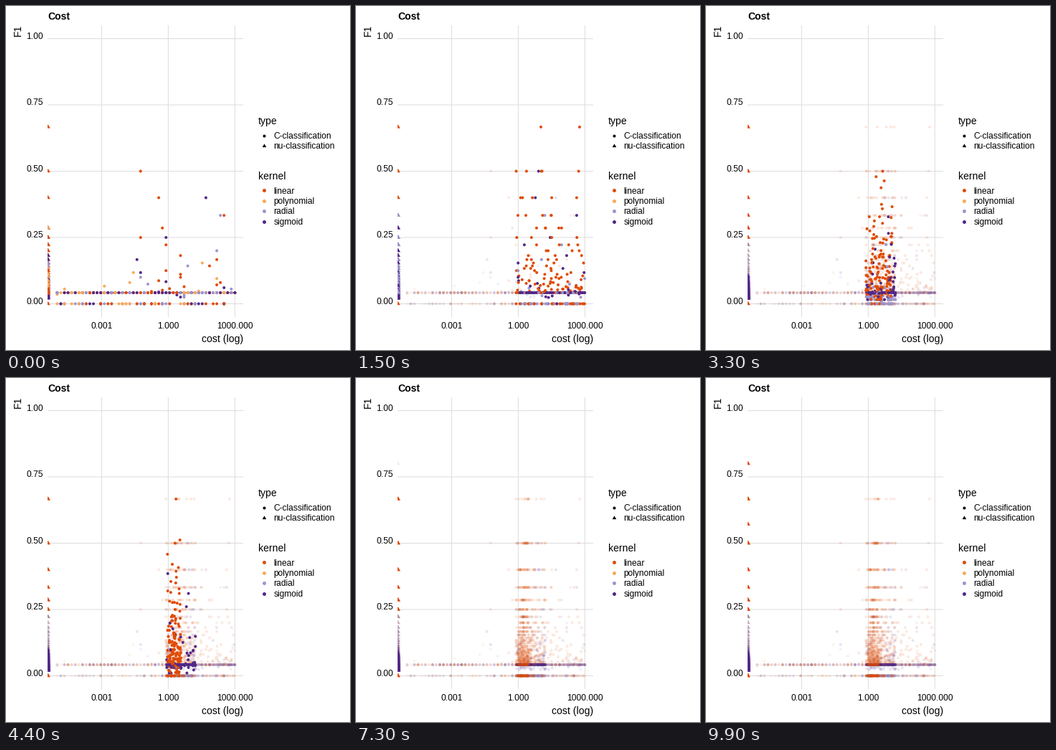
Recreate the animation shown at these times as a matplotlib script. Size 480 by 480 pixels, loop 10000 ms.

```python
import numpy as np
import matplotlib.pyplot as plt
from matplotlib.animation import FuncAnimation
from matplotlib.patches import Rectangle

SIZE, DPI, FRAMES = 480, 100, 100
PT = 72 / DPI
LEFT, RIGHT, TOP, BOTTOM = 58, 331, 27, 434
COLORS = {"linear": "#e04b04", "polynomial": "#fba859",
          "radial": "#9c95cc", "sigmoid": "#522888"}
KERNELS = list(COLORS)
FADE = 0.12
COMMON = 2 / 48  # the score most models share

# Evenly timed generations; the second one brings nothing new.
KEYS = np.delete(np.round(np.arange(14) * (FRAMES - 1) / 13).astype(int), 1)

# Last generation with circles, then count, share common, share zero, best k, worst k
LAST = {"linear": 7, "polynomial": 0, "radial": 4, "sigmoid": 5}
MIX = {"linear": (150, .15, .17, 3, 45),
       "polynomial": (95, .7, .22, 10, 60),
       "radial": (70, .35, .5, 4, 90),
       "sigmoid": (105, .74, .05, 3, 90)}

rng = np.random.default_rng(7)
SPREAD = {k: rng.random(MIX[k][0]) for k in KERNELS}


def to_y(score):
    return 415.5 - 370 * np.asarray(score, float)


def levels(n, best, worst):
    """Scores of the form 2/k, few good ones and many poor ones."""
    u = (np.arange(n) + .5) / n
    return 2 / np.round(best * (worst / best) ** u ** .7)


def scores(n, common, zero, best, worst):
    a, b = round(n * common), round(n * zero)
    y = np.r_[np.full(a, COMMON), np.zeros(b), levels(n - a - b, best, worst)]
    return rng.permutation(y)


def first_circles(kern):
    """A coarse grid over all costs; good scores need a high cost."""
    extra = .2 if kern == "linear" else .09
    y = scores(95, .8 - extra, .2, *MIX[kern][3:])
    i = rng.integers(0, 50, len(y))
    good = (y > 0) & (y != COMMON) & (kern != "polynomial")
    i = np.where(good, 22 + i * 27 // 49, i)
    return 71.4 + i * 248 / 49, y


def circles(g):
    out = {}
    for kern in KERNELS:
        if g > LAST[kern]:
            continue
        if g == 0:
            out[kern] = first_circles(kern)
            continue
        right = 319.4 if g == 1 else 264.5
        if kern == "linear":
            right = np.interp(g, [1, 2, 3, 5], [319.4, 264.5, 264.5, 241])
        left = 223 + 3 * (kern == "linear" and g > 4)
        out[kern] = (left + SPREAD[kern] * (right - left), scores(*MIX[kern]))
    return out


def triangles(g):
    """Models without a cost, stacked on the left edge."""
    top = [np.inf, *range(3, min(6 + g, 9))]
    if g == 7 or g > 9:
        top.append(2.5)
    if g > 9:
        top.append(3.5)
    out = {"linear": 2 / np.array(top)}
    for kern in KERNELS[(0, 2, 3)[min(g, 2)]:]:
        best = 15 + g if g > 1 else 6
        cloud = levels(60 if g else 34, best, 100 if kern == "sigmoid" else 55)
        out[kern] = np.r_[out.get(kern, []), cloud]
    return {k: (np.full(len(y), LEFT + .7), y) for k, y in out.items()}


dots = [circles(g) for g in range(len(KEYS))]
tris = [triangles(g) for g in range(len(KEYS))]


def blend(a, b, t):
    if t == 0:
        return a
    out = {}
    for kern in a:
        if kern in b:
            n = min(len(a[kern][0]), len(b[kern][0]))
            out[kern] = [p[:n] * (1 - t) + q[:n] * t for p, q in zip(a[kern], b[kern])]
    return out


def flatten(group):
    """Positions and colours of all kernels in one shuffled drawing order."""
    if not group:
        return np.empty((0, 2)), []
    xy = np.concatenate([np.c_[x, to_y(y)] for x, y in group.values()])
    cols = np.repeat([COLORS[k] for k in group], [len(v[0]) for v in group.values()])
    order = np.random.default_rng(3).permutation(len(xy))
    return xy[order], list(cols[order])


fig = plt.figure(figsize=(SIZE / DPI, SIZE / DPI), dpi=DPI, facecolor="white")
ax = fig.add_axes([0, 0, 1, 1])
ax.set(xlim=(0, SIZE), ylim=(SIZE, 0))
ax.axis("off")
panel = Rectangle((LEFT, TOP), RIGHT - LEFT, BOTTOM - TOP, transform=ax.transData)


def label(x, y, s, px=12, va="baseline", **kw):
    ax.text(x, y, s, fontsize=px * PT, family="Liberation Sans", color="black",
            va=va, **kw)


def rule(xs, ys):
    ax.plot(xs, ys, color="#dedede", lw=1.07 * PT, snap=False, zorder=0,
            solid_capstyle="butt")


def marks(xy, cols, tri=False, r=None, clip=True, **kw):
    r = r or (3.5 if tri else 2)
    xy = np.asarray(xy, float)
    pts = ax.scatter(xy[:, 0], xy[:, 1], s=(2 * r * PT) ** 2, c=cols, linewidths=0,
                     marker=(3, 0, 0) if tri else "o", **kw)
    if clip:
        pts.set_clip_path(panel)
    return pts


for v in np.linspace(0, 1, 5):
    y = to_y(v)
    rule([LEFT, RIGHT], [y, y])
    label(52, y + .4, f"{v:.2f}", ha="right")
for i, s in enumerate(("0.001", "1.000", "1000.000")):
    x = 133.4 + 93 * i
    rule([x, x], [TOP, BOTTOM])
    label(x - .2, 449.5, s, ha="center")

label(58, 19, "Cost", 14, weight="bold")
label(331, 469, "cost (log)", 14, ha="right")
label(24, 26, "F1", 14, rotation=90, ha="right", va="top")

label(352, 165, "type", 14)
label(352, 242, "kernel", 14)
for i, name in enumerate(("C-classification", "nu-classification")):
    y = 181 + 14.4 * i
    marks([(359.8, y)], "black", tri=i == 1, r=2 + 1.2 * i, clip=False)
    label(373.4, y + 4, name)
for i, (name, color) in enumerate(COLORS.items()):
    y = 257.3 + 14.4 * i
    marks([(359.8, y)], color, r=2.5, clip=False)
    label(373.4, y + 4.3, name)

shadows = [(marks(*flatten(d), alpha=FADE, zorder=2),
            marks(*flatten(t), tri=True, alpha=FADE, zorder=2))
           for d, t in zip(dots, tris)]
live_dots = marks([(0, 0)], "black", zorder=3)
live_tris = marks([(0, 0)], "black", tri=True, zorder=3)


def draw(f):
    g = int(np.searchsorted(KEYS, f, side="right")) - 1
    nxt = min(g + 1, len(KEYS) - 1)
    t = (f - KEYS[g]) / max(KEYS[nxt] - KEYS[g], 1)
    for key, pair in zip(KEYS, shadows):
        for s in pair:
            s.set_visible(bool(key < f))
    for art, data in ((live_dots, dots), (live_tris, tris)):
        xy, cols = flatten(blend(data[g], data[nxt], t))
        art.set_offsets(xy)
        art.set_facecolor(cols if len(cols) else "none")
    return [live_dots, live_tris]


anim = FuncAnimation(fig, draw, frames=FRAMES, interval=100, repeat=True,
                     repeat_delay=0, blit=False)
plt.show()
```
